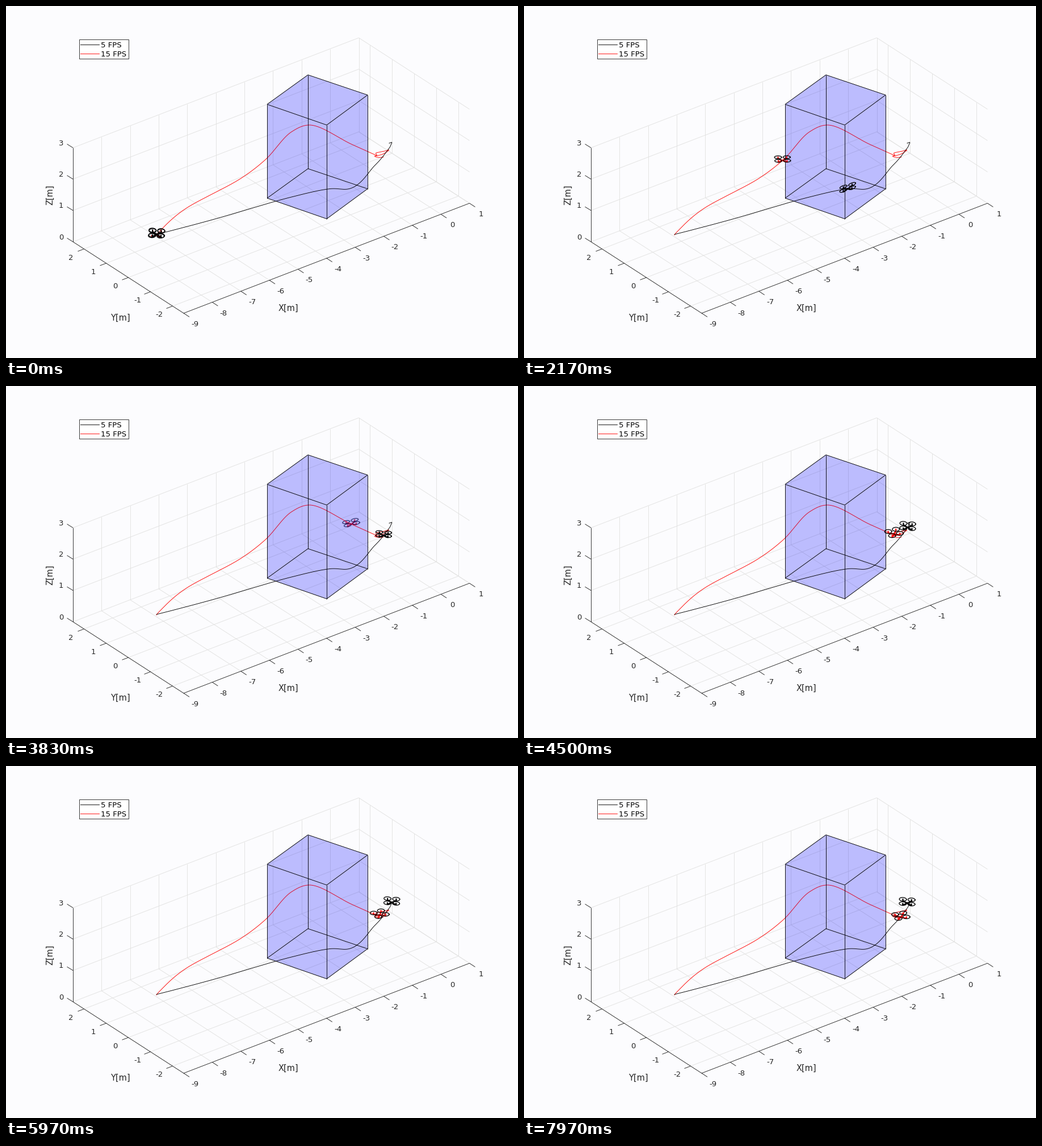
A matplotlib script for the animation above (8 s loop, 902 by 621 pixels).

```python
import numpy as np
import matplotlib.pyplot as plt
from matplotlib.animation import FuncAnimation
from matplotlib.collections import LineCollection
from matplotlib.patches import Polygon, Rectangle

W, H, DPI = 902, 621, 64
PX = 72 / DPI                      # one pixel in points
THIN = 0.9 * PX
FRAMES, INTERVAL = 250, 32
STEPS_PER_MS = 0.03
INK = "#262626"

plt.rcParams["font.family"] = "DejaVu Sans"
fig = plt.figure(figsize=(W / DPI, H / DPI), dpi=DPI, facecolor="#fcfcfe")
ax = fig.add_axes([0, 0, 1, 1])
ax.set_xlim(0, W)
ax.set_ylim(H, 0)
ax.axis("off")


def project(x, y, z):
    return (313 + 50.35 * (x + 9) - 39 * (y + 2.5),
            542 - 19.4 * (x + 9) - 25.2 * (y + 2.5) - 55.3 * z)


def segments(segs, color, z):
    ax.add_collection(LineCollection(segs, colors=color, linewidths=THIN, zorder=z))


def label(x, y, s, size=13.2, color=INK, **kw):
    kw = {"ha": "center", "va": "center_baseline", **kw}
    ax.text(x, y, s, fontsize=size * PX, color=color, zorder=9, **kw)


def draw_axes():
    xs, ys = range(-8, 2), range(-2, 3)
    grid = [(project(x, 2.5, 0), project(x, 2.5, 3)) for x in xs]
    grid += [(project(1, y, 0), project(1, y, 3)) for y in ys]
    grid += [(project(x, -2.5, 0), project(x, 2.5, 0)) for x in xs]
    grid += [(project(-9, y, 0), project(1, y, 0)) for y in ys]
    for z in range(4):
        grid.append((project(-9, 2.5, z), project(1, 2.5, z)))
        grid.append((project(1, 2.5, z), project(1, -2.5, z)))
    segments(grid, "#e2e2e1", 1)

    lines = [(project(-9, 2.5, 3), project(-9, 2.5, 0)),
             (project(-9, 2.5, 0), project(-9, -2.5, 0)),
             (project(-9, -2.5, 0), project(1, -2.5, 0))]

    def tick(value, p, mark, text):
        lines.append((p, (p[0] + mark[0], p[1] + mark[1])))
        label(p[0] + text[0], p[1] + text[1], str(value))

    for x in range(-9, 2):
        tick(x, project(x, -2.5, 0), (10, 6.5), (20, 18))
    for y in ys:
        tick(y, project(-9, y, 0), (-11, 4.2), (-23, 14))
    for z in range(4):
        tick(z, project(-9, 2.5, z), (-10.5, -6.5), (-21, -9.5))
    segments(lines, INK, 2)
    label(497.5, 532, "X[m]", 14.5)
    label(202.5, 548.5, "Y[m]", 14.5)
    label(77.5, 333, "Z[m]", 14.5, rotation=90, va="center")


def draw_legend():
    ax.add_patch(Rectangle((128.5, 58.5), 87, 34, fc="white", ec=INK, lw=THIN, zorder=8))
    for y, color, name in ((67.5, "black", "5 FPS"), (83.5, "red", "15 FPS")):
        ax.plot([131, 164], [y, y], color=color, lw=THIN, zorder=9)
        label(167, y + 0.5, name, color="black", ha="left")


def draw_box():
    top = np.array([(532, 121.5), (637, 157), (565, 210), (460, 173.5)])
    bottom = top + (0, 165.5)
    outline = [top[0], top[1], bottom[1], bottom[2], bottom[3], top[3]]
    for z in (3, 5):               # far faces, near faces
        ax.add_patch(Polygon(outline, fc="blue", alpha=0.134, lw=0, zorder=z))
    edges = []
    for i in range(4):
        j = (i + 1) % 4
        edges += [(top[i], top[j]), (bottom[i], bottom[j]), (top[i], bottom[i])]
    segments(edges, "black", 5.5)


def smooth(keys):
    """Hermite curve through rows of (step, x, y)."""
    keys = np.array(keys, float)
    t, v = keys[:, 0], keys[:, 1:]
    m = np.gradient(v, t, axis=0)

    def at(s):
        s = np.clip(s, t[0], t[-1])
        i = np.clip(np.searchsorted(t, s, side="right") - 1, 0, len(t) - 2)
        h = t[i + 1] - t[i]
        u = ((s - t[i]) / h)[..., None]
        h = h[..., None]
        return ((1 + 2 * u) * (1 - u) ** 2 * v[i] + u * (1 - u) ** 2 * h * m[i]
                + u * u * (3 - 2 * u) * v[i + 1] + u * u * (u - 1) * h * m[i + 1])
    return at


def bump(s, mid, width):
    return np.exp(-((s - mid) / width) ** 2)


climb = smooth([(0, 265, 404), (10, 270, 398), (31, 318, 356.5), (51, 414, 304),
                (65, 456, 272), (83, 503, 222), (94, 533, 210), (115, 609, 244),
                (129, 653, 264)])
black_path = smooth([(0, 265, 403), (12, 281, 399), (31, 371, 375), (50, 497, 338.5),
                     (65, 571, 322.5), (75, 602, 323), (100, 650, 281),
                     (125, 672, 255), (157, 678.5, 244), (239, 675, 242)])


def hover(s):
    """Slowing, sinking loop around the goal."""
    q = 2 * np.log2(1 + (np.maximum(s, 128) - 157) / 43)
    phi = q * np.pi / 2
    x = 662 + 12.5 * np.cos(phi)
    y = 258.25 + 2.5 * q - 3 * np.cos(phi) - 1.25 * np.cos(2 * phi)
    return np.stack([x, y], axis=-1)


def red_path(s):
    u = np.clip((s - 128) / 18, 0, 1)[..., None]
    u = u * u * (3 - 2 * u)
    return (1 - u) * climb(s) + u * hover(s)


def pitch(s):
    """Depth slope: rocks in flight, settles at the goal."""
    return 0.5 + 0.16 * np.cos(2 * np.pi * (s - 8) / 42) * np.exp(-(s / 130) ** 6)


# heading in degrees, sideways slope, depth slope
def red_pose(s):
    return (50 - 0.11 * s - 36 * bump(s, 157, 26),
            0.16 * bump(s, 30, 12) - 0.18 * bump(s, 115, 12), pitch(s))


def black_pose(s):
    return (46, 0.05 + 0.07 * bump(s, 31, 12) - 0.37 * bump(s, 65, 9), pitch(s))


ARM, RING, LIFT = 10.8, 6.3, 2.6
GAP = [(np.nan, np.nan)]
TURN = np.linspace(0, 2 * np.pi, 33)


class Drone:
    def __init__(self, path, pose, color, z):
        self.path, self.pose, self.z = path, pose, z
        self.arms, = ax.plot([], [], color=color, lw=2.2 * PX)
        self.rings, = ax.plot([], [], color="black", lw=1.3 * PX)

    def place(self, step, behind=False):
        pos = self.path(np.array(step))
        heading, side, depth = self.pose(step)

        def flat(angle, radius):
            u, v = radius * np.cos(angle), radius * np.sin(angle)
            return np.column_stack([u, side * u + depth * v])

        tips = pos + flat(np.radians(heading) + np.arange(4) * np.pi / 2, ARM)
        disc = flat(TURN, RING)
        arms, rings = [], []
        for tip in tips:
            hub = tip - (0, LIFT)
            arms += [pos, tip, hub, *GAP]
            rings += [*(hub + disc), *GAP]
        for line, pts in ((self.arms, arms), (self.rings, rings)):
            line.set_data(*np.array(pts).T)
            line.set_alpha(0.72 if behind else 1)
            line.set_zorder(2.5 if behind else self.z)


draw_axes()
draw_legend()
draw_box()
trail = np.linspace(0, 242, 700)
ax.plot(*red_path(trail).T, color="red", lw=THIN, zorder=4)
ax.plot(*black_path(trail).T, color="black", lw=THIN, zorder=6)
red = Drone(red_path, red_pose, "red", 6.5)
black = Drone(black_path, black_pose, "black", 7)


def update(i):
    step = (i + 0.5) * INTERVAL * STEPS_PER_MS
    red.place(step, behind=70 < step < 123)
    black.place(step)
    return red.arms, red.rings, black.arms, black.rings


anim = FuncAnimation(fig, update, frames=FRAMES, interval=INTERVAL,
                     init_func=lambda: update(0), repeat=True, repeat_delay=0)
plt.show()
```
